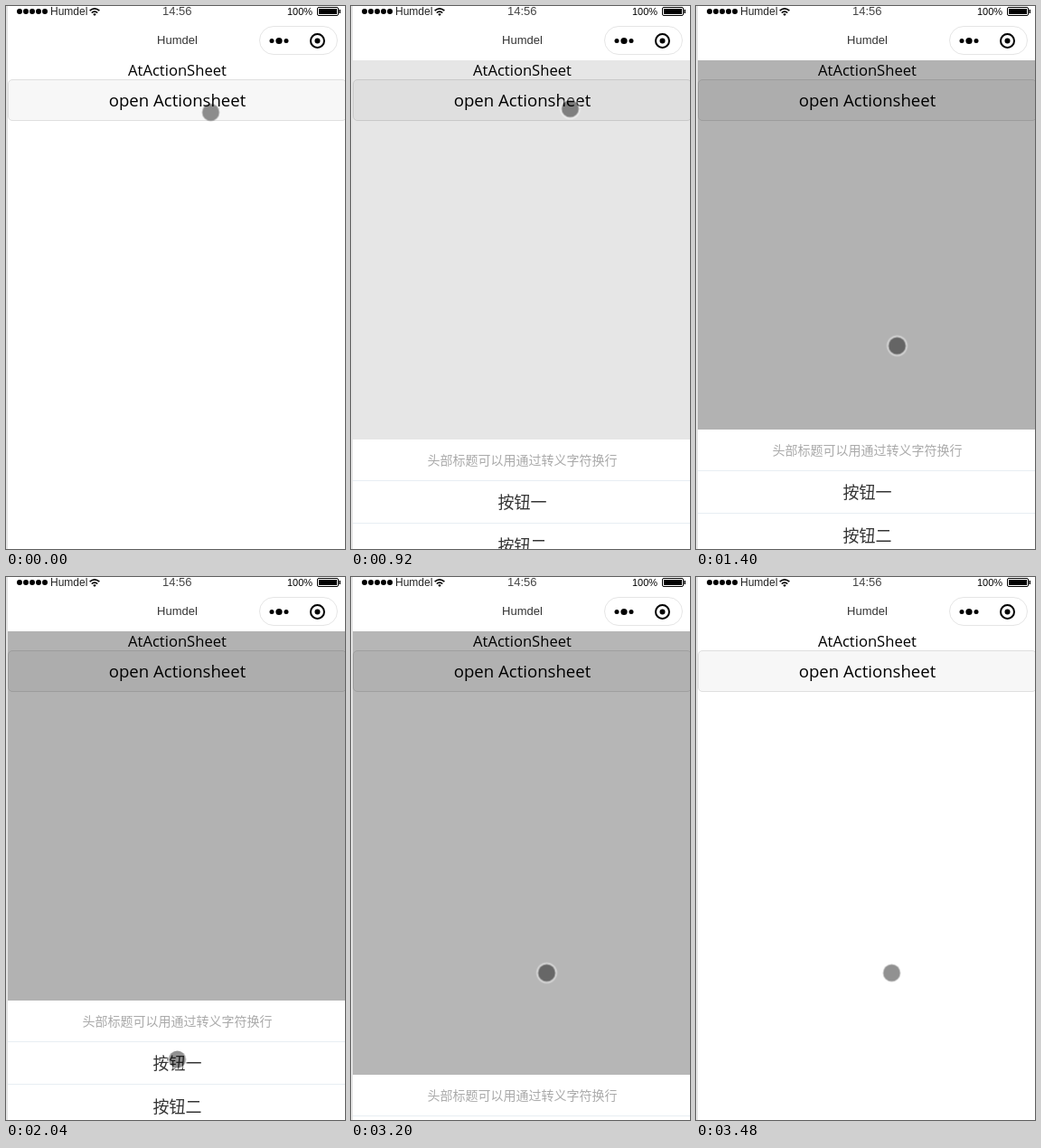
Animation of 375x600 px, one loop 4.48 s. Source, as an HTML page:

```html
<!DOCTYPE html>
<html lang="zh-CN">
<head>
<meta charset="utf-8">
<title>Action sheet</title>
<style>
html, body { margin: 0; width: 100%; height: 100%; overflow: hidden; background: #fff; }
svg { display: block; }
text { font-family: "Liberation Sans", Arial, sans-serif; }
.latin { font-family: "Open Sans", "Noto Sans", sans-serif; }
.cjk { font-family: "Noto Sans CJK SC", "Noto Sans CJK", sans-serif; }
.mid { text-anchor: middle; }

.mask, .sheet, .cursor, .dot, .ring { animation: 4480ms step-end infinite; }
.mask { animation-name: mask; }
.sheet { animation-name: sheet; }
.cursor { animation-name: cursor; }
.dot { animation-name: press-dot; }
.ring { fill: none; animation-name: press-ring; }

@keyframes mask {
  0% { opacity: 0; }
  17.85% { opacity: .007; }
  18.75% { opacity: .028; }
  20.53% { opacity: .098; }
  22.32% { opacity: .2; }
  24.1% { opacity: .3; }
  71.42% { opacity: .287; }
  72.32% { opacity: .263; }
  74.1% { opacity: .188; }
  75.89% { opacity: .08; }
  77.67%, 100% { opacity: 0; }
}
@keyframes sheet {
  0% { transform: translateY(199px); }
  18.75% { transform: translateY(61px); }
  20.53% { transform: translateY(11px); }
  22.32% { transform: translateY(1px); }
  24.1% { transform: translateY(0); }
  71.42% { transform: translateY(82px); }
  72.32%, 100% { transform: translateY(199px); }
}
@keyframes cursor {
  0% { transform: translate(226.5px, 117.5px); }
  5.35% { transform: translate(229px, 117px); }
  7.14% { transform: translate(236px, 114.5px); }
  8.92% { transform: translate(244.5px, 111.5px); }
  10.71% { transform: translate(242.5px, 113.5px); }
  25.89% { transform: translate(239.5px, 119.5px); }
  27.67% { transform: translate(236px, 185px); }
  29.46% { transform: translate(229px, 280px); }
  31.25% { transform: translate(222.5px, 375.5px); }
  33.03% { transform: translate(212px, 445px); }
  34.82% { transform: translate(203px, 490px); }
  36.6% { transform: translate(196px, 516px); }
  37.5% { transform: translate(192.5px, 529.5px); }
  39.28% { transform: translate(194.5px, 527.5px); }
  41.07% { transform: translate(188.5px, 538.5px); }
  45.53% { transform: translate(189.5px, 533px); }
  47.32% { transform: translate(193px, 518px); }
  48.21% { transform: translate(197px, 502px); }
  50% { transform: translate(203px, 480px); }
  51.78% { transform: translate(209px, 461px); }
  53.57% { transform: translate(212.5px, 449.5px); }
  57.14% { transform: translate(214.5px, 444px); }
  58.92%, 100% { transform: translate(216.5px, 437.5px); }
}
@keyframes press-dot {
  0%, 17.85%, 71.42%, 100% { fill: rgba(0, 0, 0, .43); }
  15.17%, 69.64% { fill: rgba(184, 180, 30, .8); }
}
/* The halo only shows from the first press on. */
@keyframes press-ring {
  0% { stroke: transparent; stroke-width: 2; }
  15.17%, 69.64% { stroke: rgba(255, 255, 70, .75); stroke-width: 2.6; }
  17.85%, 71.42%, 100% { stroke: rgba(255, 255, 255, .43); stroke-width: 2; }
}
</style>
</head>
<body>
<svg width="375" height="600" viewBox="0 0 375 600">
  <rect width="375" height="600" fill="#fff"/>

  <!-- page -->
  <text class="latin mid" x="189.5" y="77" font-size="16.6">AtActionSheet</text>
  <rect x="2.5" y="81.5" width="374" height="45" rx="4.5" fill="#f7f7f7" stroke="#dfdfdf"/>
  <text class="latin mid" x="189.5" y="111" font-size="18.6">open Actionsheet</text>
  <rect class="mask" x="2" y="60" width="373" height="540"/>

  <!-- action sheet -->
  <g class="sheet mid">
    <rect x="2" y="468" width="373" height="199" fill="#fff"/>
    <path d="M2 513.5H375M2 560.5H375" stroke="#e8eef3"/>
    <text class="cjk" x="189.5" y="496" font-size="14" fill="#aaa">头部标题可以用通过转义字符换行</text>
    <text class="cjk" x="189.5" y="544" font-size="18" fill="#333">按钮一</text>
    <text class="cjk" x="189.5" y="592" font-size="18" fill="#333">按钮二</text>
  </g>

  <!-- status bar -->
  <path d="M15 6h.01M22 6h.01M29 6h.01M36 6h.01M43 6h.01" stroke="#000" stroke-width="6" stroke-linecap="round"/>
  <text x="49" y="10" font-size="12" fill="#222">Humdel</text>
  <g fill="none" stroke="#000" stroke-width="1.6">
    <path d="M92.6 5.2Q98 .4 103.4 5.2M94.7 7.5Q98 4.6 101.3 7.5"/>
    <path d="M96.2 9L98 11L99.8 9Q98 7.6 96.2 9Z" fill="#000" stroke="none"/>
  </g>
  <text class="mid" x="189.3" y="10" font-size="13" fill="#444">14:56</text>
  <text x="311" y="10" font-size="11">100%</text>
  <rect x="344.5" y="1.5" width="23" height="9" rx="1.5" fill="none" stroke="#000"/>
  <rect x="346" y="3" width="20" height="6"/>
  <rect x="368.5" y="4" width="1.5" height="4"/>

  <!-- navigation bar -->
  <text class="mid" x="189.5" y="42" font-size="13" fill="#333">Humdel</text>
  <rect x="280.5" y="22.5" width="86" height="31" rx="15.5" fill="#fff" stroke="#e5e5e5"/>
  <circle cx="294" cy="38.5" r="2.5"/>
  <circle cx="302" cy="38.5" r="3.6"/>
  <circle cx="310" cy="38.5" r="2.5"/>
  <circle cx="344.5" cy="38.5" r="7.5" fill="none" stroke="#000" stroke-width="2"/>
  <circle cx="344.5" cy="38.5" r="3"/>

  <rect width="2" height="600" fill="#e3e3e3"/>

  <g class="cursor">
    <circle class="ring" r="10.5"/>
    <circle class="dot" r="9.5"/>
  </g>
</svg>
</body>
</html>
```
